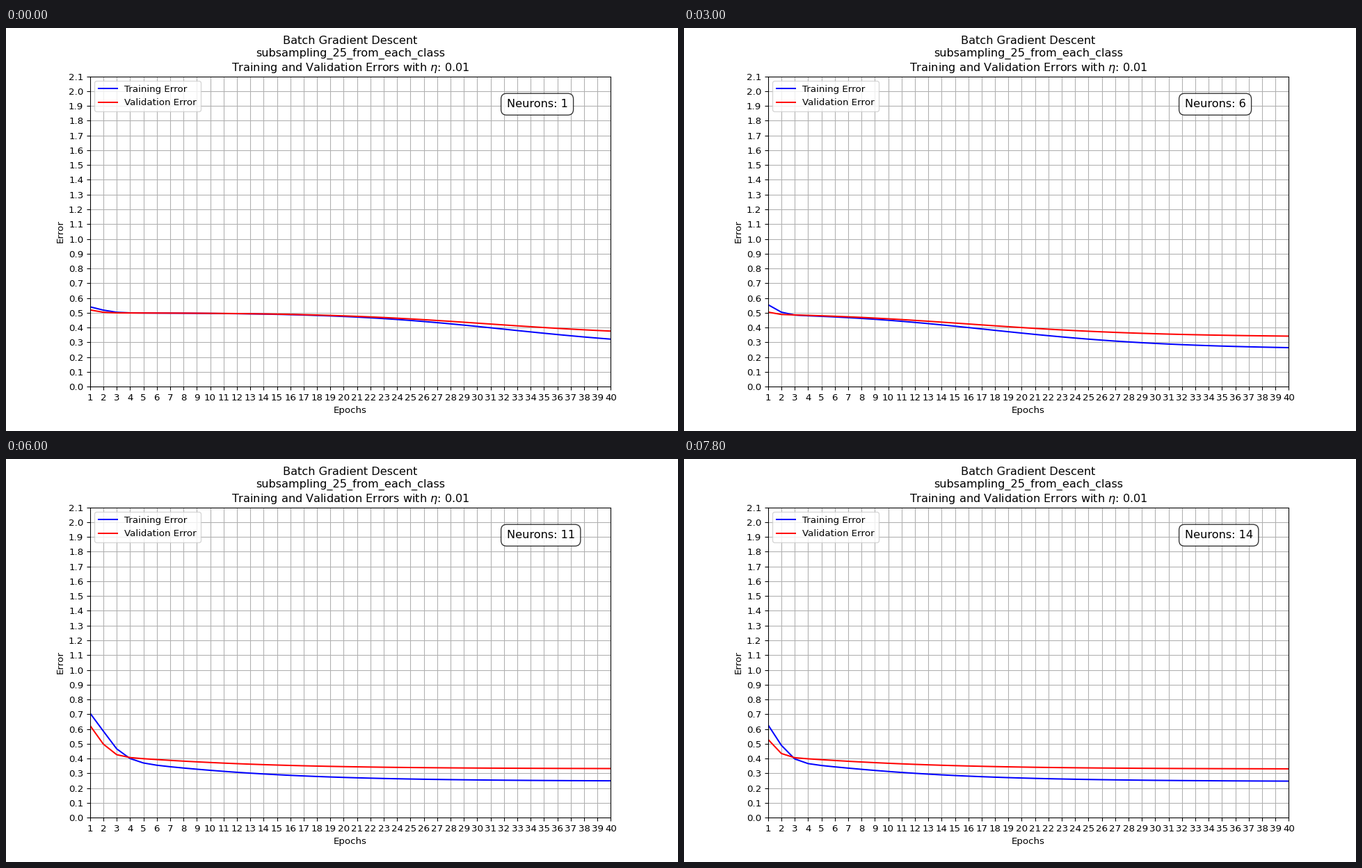
Write a matplotlib script that moves like this. It is 966 px wide and 580 px high and loops after 8000 ms.

```python
import matplotlib.pyplot as plt
import numpy as np
from matplotlib.animation import FuncAnimation

DPI = 96.6
WIDTH, HEIGHT = 966, 580
STEP_MS = 200      # drawing interval
HOLD = 3           # intervals per neuron count
FRAMES = 40

EPOCHS = np.arange(1, 41)
PLATEAU = 0.5

# Key settings of a run by neuron count; other counts lie in between.
NEURONS = [1, 2, 4, 6, 9, 12, 14]
HEAD_START = [0, 17, 21, 14.7, 29.7, 29.5, 30.5]
TRAIN_KICK = [.041, .046, .132, .067, .313, .305, .238]
VALID_KICK = [.020, .012, .065, .015, .190, .205, .113]
KICK_RATE = [.46, .28, .44, .28, .61, .645, .458]


def descent(epoch, middle, floor):
    """Slow fall from the plateau to the floor, with a long tail."""
    x = epoch - middle
    return floor + (PLATEAU - floor) / (1 + np.exp(0.148 * x - 0.0011 * x**2))


def errors(neurons):
    """Training and validation error: a shared descent plus an early kick."""
    start, train_kick, valid_kick, rate = (
        np.interp(neurons, NEURONS, values)
        for values in (HEAD_START, TRAIN_KICK, VALID_KICK, KICK_RATE))
    gain = 0.0006 * neurons
    fade = rate ** ((EPOCHS - 1) ** 1.5)
    train = descent(EPOCHS + start, 33.5, 0.251 - gain) + train_kick * fade
    valid = descent(EPOCHS + start, 32, 0.336 - gain) + valid_kick * fade**2
    return train, valid


# The small margin keeps the pixel size from rounding down.
fig, ax = plt.subplots(figsize=((WIDTH + 0.01) / DPI, (HEIGHT + 0.01) / DPI),
                       dpi=DPI)
train_line, = ax.plot([], [], color="blue", label="Training Error")
valid_line, = ax.plot([], [], color="red", label="Validation Error")
counter = ax.text(0.8, 0.9, "", transform=ax.transAxes, fontsize=12,
                  bbox=dict(boxstyle="round,pad=0.5", facecolor="white",
                            edgecolor="black", alpha=0.8))

ax.set_title("Batch Gradient Descent\nsubsampling_25_from_each_class\n"
             r"Training and Validation Errors with $\eta$: 0.01")
ax.set_xlabel("Epochs")
ax.set_ylabel("Error")
ax.set_xticks(EPOCHS)
ax.set_yticks(np.arange(22) / 10)
ax.set_xlim(1, 40)
ax.set_ylim(0, 2.1)
ax.grid(True)
ax.legend(loc="upper left")


def update(frame):
    neurons = frame // HOLD + 1
    train, valid = errors(neurons)
    train_line.set_data(EPOCHS, train)
    valid_line.set_data(EPOCHS, valid)
    counter.set_text(f"Neurons: {neurons}")
    return train_line, valid_line, counter


anim = FuncAnimation(fig, update, frames=FRAMES, interval=STEP_MS,
                     repeat=True, repeat_delay=0)
plt.show()
```
